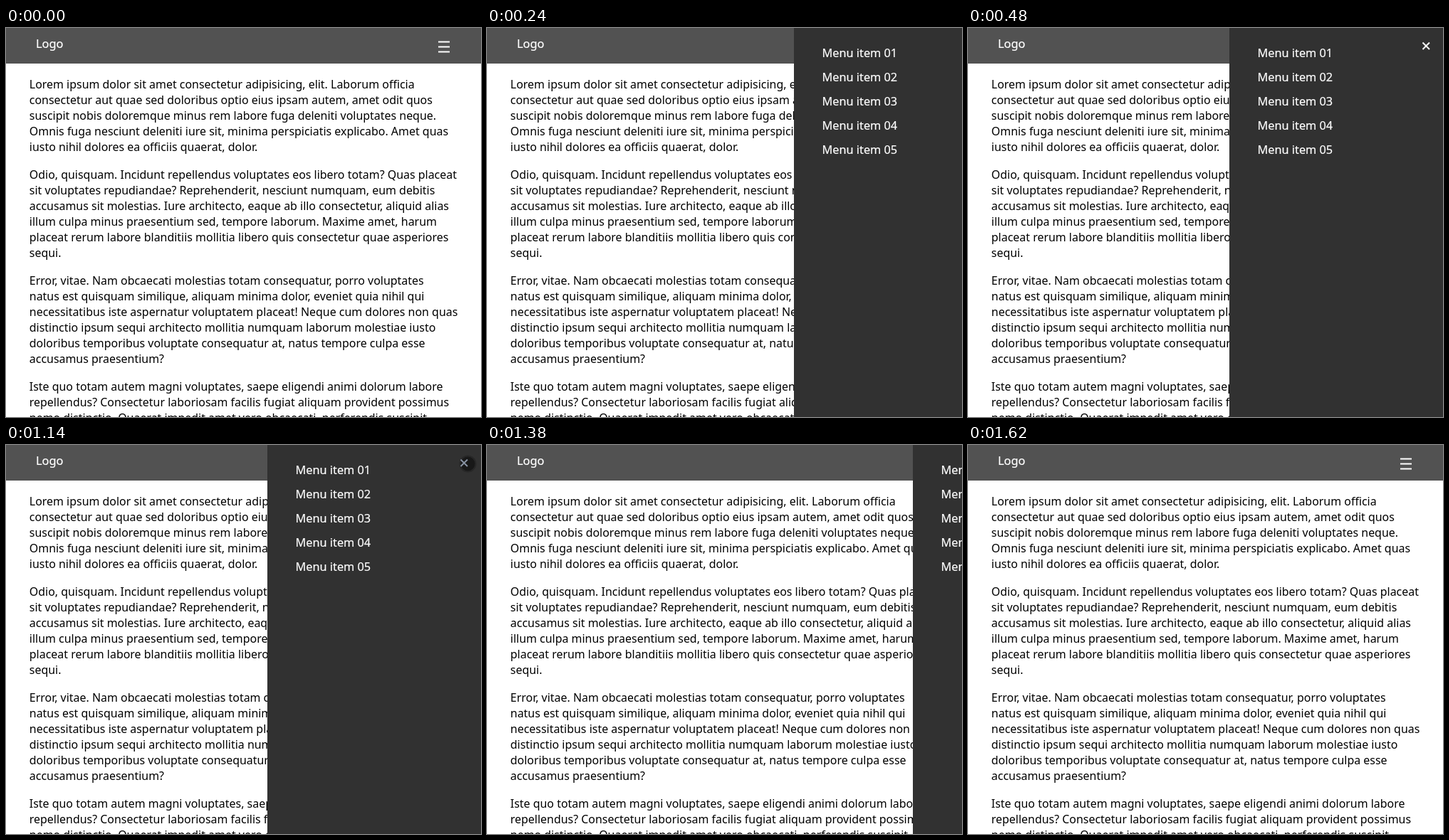
An HTML page for the animation above (1.75 s loop, 667x547 px).

```html
<!DOCTYPE html>
<html lang="en">
<head>
<meta charset="utf-8">
<title>Sliding menu</title>
<style>
  html, body { margin: 0; width: 100%; height: 100%; overflow: hidden; background: #fff; }
  body { position: relative; font: 15.95px/22px "Noto Sans", sans-serif; color: #000; }
  header { position: absolute; top: 0; left: 0; width: 100%; height: 50px; background: #525252; }
  .logo { position: absolute; left: 42px; top: 11px; color: #fff; font-size: 16.4px; }
  .logo, ul { -webkit-text-stroke: 0.2px #fff; }
  svg { position: absolute; left: 0; top: 0; overflow: visible; }
  main { position: absolute; left: 32.8px; top: 68px; white-space: pre; }
  p { margin: 0 0 17px; }
  nav { position: absolute; left: 367px; top: 0; width: 300px; height: 100%; background: #313131; color: #fff; }
  ul { position: absolute; left: 39.5px; top: 18px; margin: 0; padding: 0; list-style: none; font-size: 16.3px; line-height: 34px; white-space: nowrap; }
</style>
</head>
<body>
<header>
  <div class="logo">Logo</div>
  <svg width="667" height="50"><path d="M607 19.5h16M607 26.5h16M607 33.5h16" stroke="#fff" stroke-width="2"/></svg>
</header>
<main><p>Lorem ipsum dolor sit amet consectetur adipisicing, elit. Laborum officia
consectetur aut quae sed doloribus optio eius ipsam autem, amet odit quos
suscipit nobis doloremque minus rem labore fuga deleniti voluptates neque.
Omnis fuga nesciunt deleniti iure sit, minima perspiciatis explicabo. Amet quas
iusto nihil dolores ea officiis quaerat, dolor.</p><p>Odio, quisquam. Incidunt repellendus voluptates eos libero totam? Quas placeat
sit voluptates repudiandae? Reprehenderit, nesciunt numquam, eum debitis
accusamus sit molestias. Iure architecto, eaque ab illo consectetur, aliquid alias
illum culpa minus praesentium sed, tempore laborum. Maxime amet, harum
placeat rerum labore blanditiis mollitia libero quis consectetur quae asperiores
sequi.</p><p>Error, vitae. Nam obcaecati molestias totam consequatur, porro voluptates
natus est quisquam similique, aliquam minima dolor, eveniet quia nihil qui
necessitatibus iste aspernatur voluptatem placeat! Neque cum dolores non quas
distinctio ipsum sequi architecto mollitia numquam laborum molestiae iusto
doloribus temporibus voluptate consequatur at, natus tempore culpa esse
accusamus praesentium?</p><p>Iste quo totam autem magni voluptates, saepe eligendi animi dolorum labore
repellendus? Consectetur laboriosam facilis fugiat aliquam provident possimus
nemo distinctio. Quaerat impedit amet vero obcaecati, perferendis suscipit</p></main>
<nav id="menu">
  <ul>
    <li>Menu item 01</li>
    <li>Menu item 02</li>
    <li>Menu item 03</li>
    <li>Menu item 04</li>
    <li>Menu item 05</li>
  </ul>
  <svg width="300" height="60">
    <circle id="press" cx="281.5" cy="26.5" r="11" fill="#181818" stroke="#272727" stroke-width="2"/>
    <path id="cross" d="M271.5 20.5l9.5 9.5M281 20.5l-9.5 9.5" stroke-width="2"/>
  </svg>
</nav>
<script>
  const LOOP = 1750, STEP = 60, SLIDE = 450, WIDTH = 300;
  const OPEN_AT = 22, PRESS_AT = 1140, CLOSE_AT = 1169;
  const [menu, press, cross] = ['menu', 'press', 'cross'].map(id => document.getElementById(id));

  // cubic-bezier(.25, .1, .25, 1), the CSS "ease" curve
  const bezier = (s, a, b) => 3 * s * (1 - s) ** 2 * a + 3 * s * s * (1 - s) * b + s ** 3;
  function ease(x) {
    if (x <= 0) return 0;
    if (x >= 1) return 1;
    let low = 0, high = 1;
    for (let i = 0; i < 24; i++) {
      const mid = (low + high) / 2;
      if (bezier(mid, 0.25, 0.25) < x) low = mid; else high = mid;
    }
    return bezier(low, 0.1, 1);
  }

  function draw(now) {
    const t = Math.floor(now % LOOP / STEP) * STEP;
    const shown = ease((t - OPEN_AT) / SLIDE) - ease((t - CLOSE_AT) / SLIDE);
    const pressed = t === PRESS_AT;
    menu.style.transform = `translateX(${Math.round(WIDTH * (1 - shown))}px)`;
    press.style.visibility = pressed ? 'visible' : 'hidden';
    cross.setAttribute('stroke', pressed ? '#8792a2' : '#fff');
  }

  const start = performance.now();
  function tick() {
    draw(performance.now() - start);
    requestAnimationFrame(tick);
  }
  tick();
</script>
</body>
</html>
```
